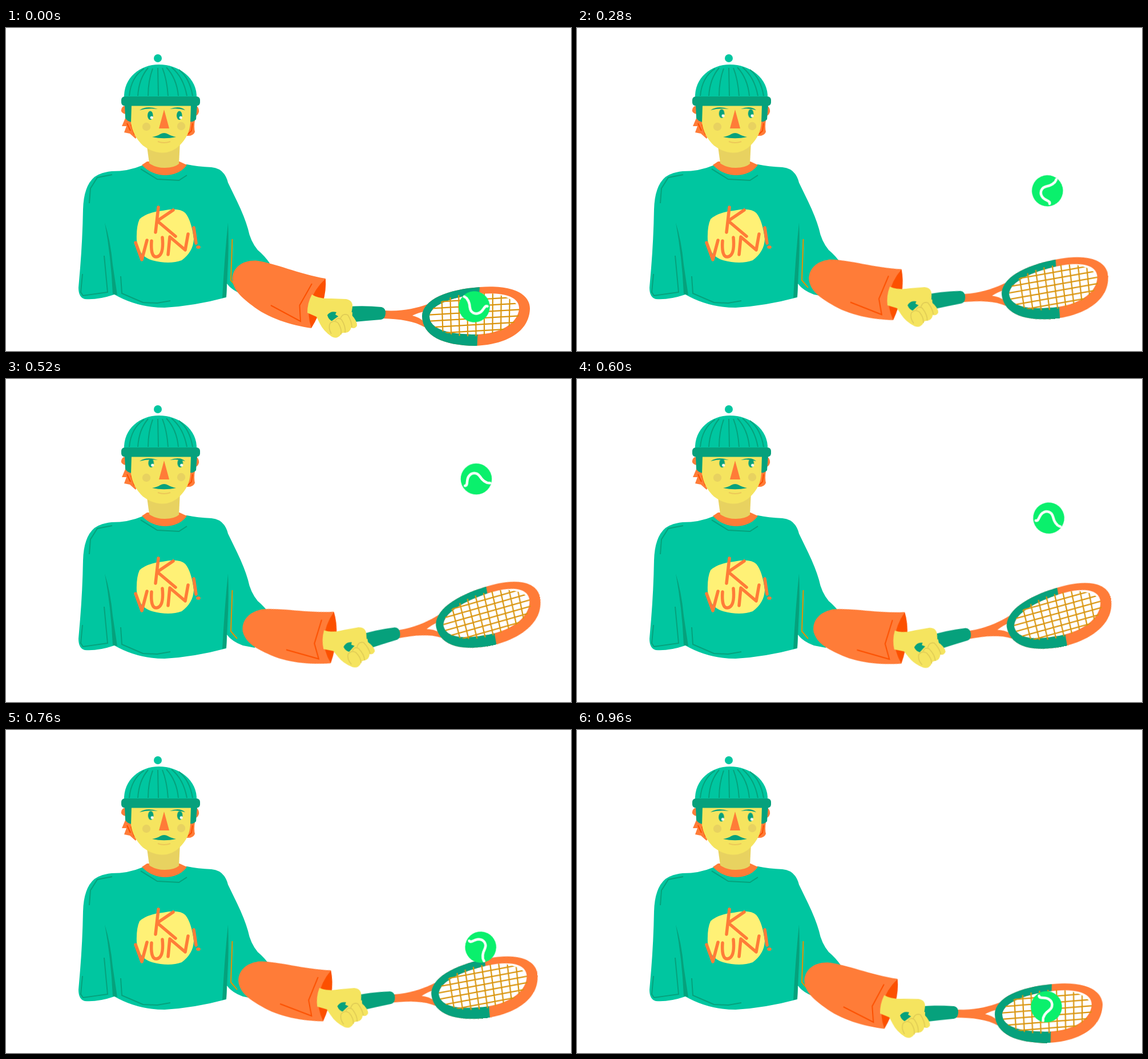
These frames come from a looping animation (990 by 566 pixels, 1000 ms). An HTML page:

```html
<!DOCTYPE html>
<html lang="en">
<head>
<meta charset="utf-8">
<title>Racket bounce</title>
<style>
  html, body { margin: 0; width: 100%; height: 100%; overflow: hidden; background: #fff; }
  svg { display: block; width: 100vw; height: 100vh; }

  .green { fill: #00c6a0; }
  .dark { fill: #06a17c; }
  .orange { fill: #ff7c38; }
  .rust { fill: #fc5000; }
  .skin { fill: #f5e45f; }
  .shade { fill: #e8d260; }
  .white { fill: #fff; }
  .line { fill: none; stroke-width: 2; stroke: #06a17c; }
  .line.hot { stroke: #fc5000; }
  .line.gold { stroke: #d9940c; stroke-width: 2.2; }
  .line.crease { stroke: #dfcb55; stroke-width: 1.6; }
  .letters { fill: none; stroke: #ff7c38; stroke-width: 5.5; stroke-linecap: round; stroke-linejoin: round; }

  /* 25 drawings per second: every segment uses one step per 40 ms */
  .arm { transform-origin: 425px 357px; animation: swing 1s infinite; }
  .eyes { animation: look 1s infinite; }
  .ball { transform-origin: 0 0; animation: bounce 1s infinite; }

  @keyframes swing {
    0% { transform: rotate(0deg); animation-timing-function: steps(14); }
    56% { transform: rotate(-13.5deg); animation-timing-function: steps(11); }
    100% { transform: rotate(0deg); }
  }
  @keyframes look {
    0% { transform: translate(0, 0); animation-timing-function: steps(14); }
    56% { transform: translate(1.5px, -6.5px); animation-timing-function: steps(11); }
    100% { transform: translate(0, 0); }
  }
  @keyframes bounce {
    0% { transform: translate(820.5px, 488.5px) rotate(-152deg); animation-timing-function: steps(2); }
    8% { transform: translate(829px, 490px) rotate(-127deg); animation-timing-function: steps(2); }
    16% { transform: translate(827.5px, 411px) rotate(-102deg); animation-timing-function: steps(7); }
    44% { transform: translate(820px, 117.5px) rotate(-26deg); animation-timing-function: steps(1); }
    48% { transform: translate(822.7px, 141px) rotate(-11deg); animation-timing-function: steps(9); }
    84% { transform: translate(834.3px, 449px) rotate(79deg); animation-timing-function: steps(1); }
    88% { transform: translate(832px, 478px) rotate(82deg); animation-timing-function: steps(2); }
    96% { transform: translate(822.5px, 485px) rotate(86deg); animation-timing-function: steps(1); }
    100% { transform: translate(820.5px, 488.5px) rotate(88deg); }
  }
</style>
</head>
<body>
<svg viewBox="0 0 990 566">
  <defs>
    <path id="rim" fill-rule="evenodd" d="M729 505C730 475 775 458 830 454C880 450 918 462 918 492C917 530 880 555 822 557C765 556 730 540 729 505Z
      M742 505C745 482 790 470 832 466C870 463 900 470 899 492C897 518 865 536 825 537C775 537 742 528 742 505Z"/>
    <clipPath id="half"><path d="M700 440H830.500L825 570H700Z"/></clipPath>
    <clipPath id="bed"><ellipse cx="821" cy="502" rx="79" ry="38" transform="rotate(-4 821 502)"/></clipPath>
  </defs>

  <!-- body -->
  <path class="green" d="M238 241Q215 251 185 251Q166 253 155 261Q136 277 135 318Q134 370 130 420L127 455Q127 472 138 475Q160 477 190 467Q230 490 278 490Q330 487 386 472L387 448Q396 460 415 467L436 471L462 412Q453 399 441 389Q428 373 424 352Q418 331 405 304L389 271Q383 246 360 244Q335 243 317 239Z"/>
  <path class="dark" d="M173 341Q183 372 187 415L195 468L187 466Q184 400 173 341Z"/>
  <path class="dark" d="M389 341Q391 380 388 430L386 471L379 473Q383 400 389 341Z"/>
  <path class="line" d="M186 257L160 262L148 281L146 307M172 399L178 463L135 469L131 463L134 431M201 435L203 465L240 481L265 482L288 478M236 247L265 265L303 267L317 258"/>
  <path class="line gold" d="M396.500 370L394 442L405 455"/>

  <!-- shirt print -->
  <path fill="#fff176" d="M234 335Q246 323 275 320Q303 314 314 324Q325 337 329 370Q328 392 308 407Q286 415 256 407Q232 400 229 372Q228 348 234 335Z"/>
  <path class="letters" d="M267 314L262 358M293 319L265 338L297 365M227 376L238 406L247 372M255 373Q253 402 264 401Q277 399 274 367M284 397L287 366L314 389L319 361M329 350L333 377M336 384L338 384"/>

  <!-- head -->
  <path class="orange" d="M247 234L238 240Q255 258 280 258Q305 257 317 240L304 234Z"/>
  <path class="shade" d="M246 200L251 237Q262 245 278 245Q295 245 303 238L305 198Z"/>
  <path class="orange" d="M209 136Q201 138 202 146Q204 150 210 151Z M333 136Q339 140 338 147Q336 154 331 154Z"/>
  <path class="orange" d="M209 158L203 172L211 172L207 183L217 185L227 194L232 186L221 160Z M320 163L331 161Q329 174 331 182Q328 190 316 189Z"/>
  <path class="line hot" d="M212 167L218 180M219 169L225 187M327 167L325 180L319 186"/>
  <path class="dark" d="M208 134L209 158Q213 164 221 165L222 134Z M322 134L335 134L333 160Q329 165 322 164Z"/>
  <path class="skin" d="M220 134L219 166Q222 189 240 206Q257 219 275 218.500Q292 218 304 206Q322 188 323 166L324 134Z"/>
  <circle class="shade" cx="246" cy="173" r="7.200"/>
  <circle class="shade" cx="307" cy="172" r="7.200"/>
  <g class="eyes">
    <ellipse class="dark" cx="252.800" cy="153.300" rx="4.800" ry="7.800"/>
    <ellipse class="dark" cx="303.800" cy="153.300" rx="4.800" ry="7.800"/>
    <circle class="white" cx="255.200" cy="157" r="2.500"/>
    <circle class="white" cx="306.200" cy="157" r="2.500"/>
  </g>
  <path class="dark" d="M234 144Q247 135 266 142Q248 140 234 144Z M287 142Q304 135 314 144Q302 140 287 142Z"/>
  <path class="orange" d="M277 143L286 176L268 176Z"/>
  <path class="dark" d="M256 191Q266 189 270 186Q277 182 284 186Q289 189 298 191Q277 195.500 256 191Z"/>
  <path fill="none" stroke="#ecc858" stroke-width="2" d="M266 199Q277 203 288 199"/>

  <!-- hat -->
  <circle class="green" cx="266" cy="53" r="7"/>
  <path class="green" d="M207 124C205 87 235 64 268 64C302 64 336 87 334 124Z"/>
  <path class="line" d="M216 119Q219 86 242 71M231 119Q233 88 249 70M249 119Q249 93 257 71M267 119L266 70M284 119Q282 90 274 70M302 119Q299 88 281 69M317 119Q311 86 290 69M327 119Q322 88 303 73"/>
  <rect class="dark" x="202" y="120" width="138" height="16.500" rx="6"/>

  <g class="arm">
    <!-- cuff opening -->
    <path class="rust" d="M560 439Q563 480 535 526L522 505L530 465Z"/>

    <!-- racket -->
    <path class="orange" d="M660 495C695 497 715 492 739 484L735 525C715 513 690 510 660 509Z"/>
    <path class="white" d="M712 504Q722 499 735 496Q729 505 732 514Q722 506 712 504Z"/>
    <use href="#rim" class="orange"/>
    <use href="#rim" class="dark" clip-path="url(#half)"/>
    <g id="strings" class="line gold" clip-path="url(#bed)"></g>
    <path class="dark" d="M600 488Q630 486 658 489Q666 491 665 501Q664 510 657 511Q630 513 600 516Z"/>

    <!-- sleeve and hand -->
    <path class="orange" d="M396.500 439C398 419 414 407 438 407.500C472 412 512 431 560 439Q519 478 535 526C500 521 458 508 431 486C409 469 398 458 396.500 439Z"/>
    <path class="line hot" d="M536 448L514.500 486L516 514L464 486"/>
    <path class="skin" d="M536 467Q548 475 570 474L596 475Q608 477 607 489L605 502Q616 514 615 522Q611 528 605 525Q602 535 592 534Q588 534 587 537Q580 546 571 541Q556 531 550 518L544 506L528 499Q528 482 536 467Z"/>
    <path class="dark" d="M563 503Q569 495 579 498L577 502L585 507L573 514Q565 512 563 503Z"/>
    <path class="skin" d="M570 514Q578 508 590 500L607 498L606 520L586 536Z"/>
    <path class="line crease" d="M587 537Q589 528 582 517Q575 511 568 517Q564 525 570 536M594 534Q596 524 588 511Q581 506 577 513M606 525Q606 514 599 503Q590 499 586 509"/>
  </g>

  <g class="ball">
    <circle r="27.300" fill="#0af06c"/>
    <path fill="none" stroke="#fff" stroke-width="4.500" stroke-linecap="round" d="M-20 11.500C-14 12 -18 1 -13 -5C-8 -12 1 -12 6 -5C11 3 16 8 24 7.500"/>
  </g>
</svg>
<script>
  const count = (n, fn) => Array.from({ length: n }, (_, i) => fn(i)).join('');
  const upright = i => `M${763 + 15 * i} 455l${3 - i * 0.6} 95`;
  const across = j => `M735 ${481 + 11 * j}l170 -10`;
  document.getElementById('strings').innerHTML =
    `<path d="${count(9, upright)}${count(6, across)}"/>`;
</script>
</body>
</html>
```
